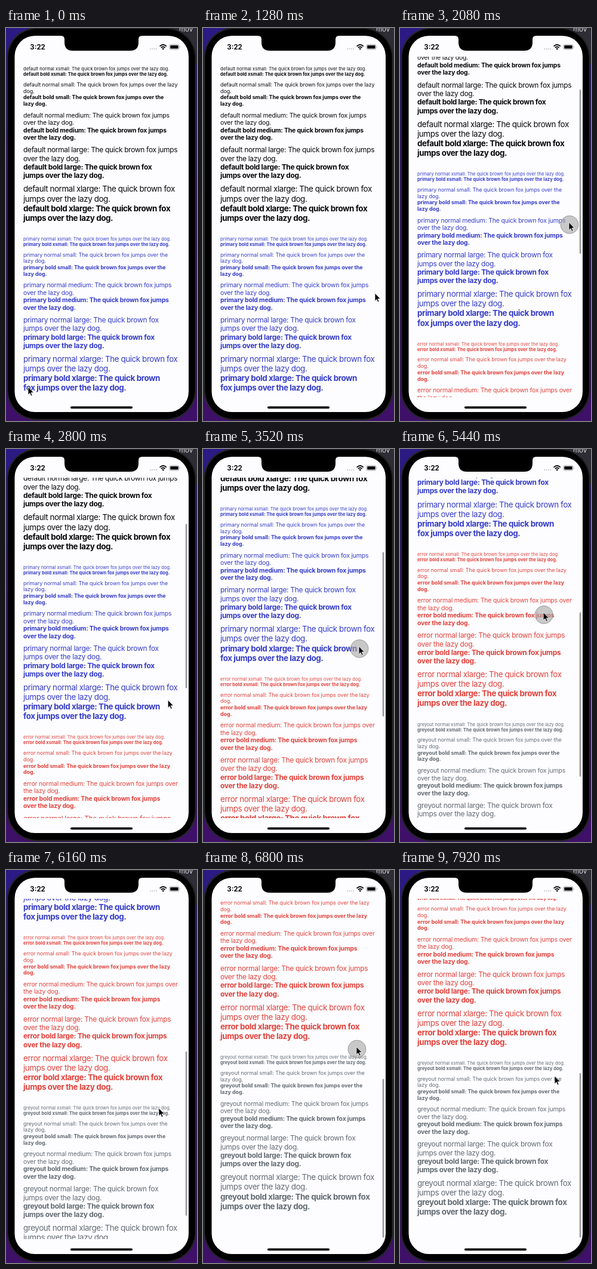
An HTML page for the animation above (8000 ms loop, 320 by 658 pixels).

```html
<!DOCTYPE html>
<html lang="en">
<head>
<meta charset="utf-8">
<title>Text styles</title>
<style>
  html, body { margin: 0; width: 100%; height: 100%; overflow: hidden; background: #1c1228; }
  svg { display: block; width: 320px; height: 658px; }
  text { font-family: Inter, "Liberation Sans", sans-serif; white-space: pre; }
  .bold { font-weight: 700; }
  .default { fill: #08080c; }
  .primary { fill: #353cc6; }
  .error { fill: #e0423c; }
  .greyout { fill: #636b72; }
</style>
</head>
<body>
<svg viewBox="0 0 320 658">
  <defs>
    <linearGradient id="desk" x2="0" y2="1">
      <stop offset="0" stop-color="#2c1a84"/>
      <stop offset="1" stop-color="#3f1068"/>
    </linearGradient>
    <clipPath id="view"><rect x="15" y="48" width="291" height="570"/></clipPath>
  </defs>

  <rect width="320" height="658" fill="url(#desk)"/>
  <path d="M250 0h70v60z" fill="#2e2c34"/>
  <text x="290" y="6" font-size="11.5" fill="#dcdce0">mov</text>

  <rect x="1" y="-1" width="318" height="658" rx="51" fill="#242428"/>
  <rect x="3.5" y="1.5" width="313" height="653" rx="48" fill="#000"/>
  <rect x="14.5" y="13" width="291.5" height="630" rx="34" fill="#fdfdff"/>
  <path d="M92 12.5h136v.5q-6 0-6 6v5q0 14-14 14h-96q-14 0-14-14v-5q0-6-6-6z" fill="#000"/>

  <text class="bold" x="53" y="36" font-size="11.3" text-anchor="middle" fill="#08080c">3:22</text>
  <path d="M242 35h10.2" stroke="#c0c0c6" stroke-width="2" stroke-linecap="round" stroke-dasharray="0 3.3"/>
  <g fill="none" stroke="#08080c" stroke-width="1.9">
    <path d="M257.6 30.6q5.6-5 11.2 0"/>
    <path d="M259.8 33q3.4-3 6.8 0"/>
  </g>
  <path d="M261.2 34.5q2-1.6 4 0l-2 2.2z" fill="#08080c"/>
  <rect x="273.9" y="27.7" width="16" height="8.2" rx="2.4" fill="none" stroke="#8c8c92" stroke-width=".8"/>
  <rect x="275.2" y="29" width="13.4" height="5.6" rx="1.3" fill="#08080c"/>
  <path d="M291 30.3q1.4 1.5 0 3z" fill="#8c8c92"/>

  <g clip-path="url(#view)"><g id="list"></g></g>
  <rect id="bar" x="300.8" width="2.4" rx="1.2" fill="#94949e"/>
  <rect x="108" y="633.4" width="104" height="3.8" rx="1.9" fill="#000"/>

  <g id="pointer">
    <circle id="touch" cx="1" cy="3" r="15" fill="#a2a2a2" fill-opacity=".58" stroke="#808080" stroke-opacity=".7"/>
    <path d="M0-1v13.2l3-2.8 2 4.7 2.1-.9-2-4.6h4.2z" fill="#000" stroke="#fff" stroke-width=".8"/>
  </g>
</svg>
<script>
const $ = id => document.getElementById(id);
const LOOP = 8000, MAX = 599, SLOP = 10;
const words = 'The quick brown fox jumps over the lazy dog.'.split(' ');
const sizeNames = ['xsmall', 'small', 'medium', 'large', 'xlarge'];
// words on the first line, normal then bold for each size
const themes = {
  default: '9987555444',
  primary: '9977554443',
  error: '9988655544',
  greyout: '9977554444'
};

function addLine(str, style, size, y, spacing) {
  const el = document.createElementNS('http://www.w3.org/2000/svg', 'text');
  const attrs = { class: style, x: 29, y, 'font-size': size, 'letter-spacing': spacing };
  for (const key in attrs) el.setAttribute(key, attrs[key]);
  el.textContent = str;
  $('list').append(el);
}

function buildList() {
  let y = 64;
  for (const [theme, fits] of Object.entries(themes)) {
    sizeNames.forEach((name, i) => {
      const points = 10 + 2 * i;
      const size = points * 0.746, height = points * 0.892;
      ['normal', 'bold'].forEach((weight, j) => {
        const n = +fits[i * 2 + j];
        const lines = [`${theme} ${weight} ${name}: ${words.slice(0, n).join(' ')}`];
        if (n < words.length) lines.push(words.slice(n).join(' '));
        for (const str of lines) {
          addLine(str, `${theme} ${weight}`, size, y + height / 2 + size * 0.364, 0.07 - 0.122 * i);
          y += height;
        }
      });
      y += 7.46;
    });
    y += 15.4;
  }
}

// each drag eases from one point to another; the pointer glides between drags
const drags = [
  { down: 1300, up: 2500, from: [288, 445], to: [281, 280] },
  { down: 2960, up: 3800, from: [270, 439], to: [258, 294] },
  { down: 4700, up: 5808, from: [252, 456], to: [236, 212] },
  { down: 6250, up: 6850, from: [256, 400], to: [257, 295] }
];
const first = { up: 200, to: [37, 602] };
const last = { down: 7500, from: [259, 346] };

const clamp = (v, lo, hi) => Math.min(hi, Math.max(lo, v));
const ease = u => u * u * (3 - 2 * u);
const glide = (t, t0, t1, a, b) => {
  const e = ease(clamp((t - t0) / (t1 - t0), 0, 1));
  return a.map((v, i) => v + (b[i] - v) * e);
};

function pointerAt(t) {
  const i = drags.findIndex(d => t < d.up);
  const next = drags[i] || last;
  if (t >= next.down) return next.to ? glide(t, next.down, next.up, next.from, next.to) : next.from;
  const prev = i < 0 ? drags[drags.length - 1] : drags[i - 1] || first;
  return glide(t, prev.up, next.down - 80, prev.to, next.from);
}

function scrollAt(t) {
  let s = 0;
  for (const d of drags) {
    if (t < d.down) break;
    const y = glide(t, d.down, d.up, d.from, d.to)[1];
    s += Math.max(0, d.from[1] - SLOP - y);
  }
  const over = Math.max(0, s - MAX) * 0.55;
  const release = drags[drags.length - 1].up;
  return Math.min(s, MAX) + over * Math.exp(-Math.max(0, t - release) / 110);
}

function draw(t) {
  const s = scrollAt(t);
  const barTop = 50.5 + s * 0.4835 + Math.max(0, s - MAX) * 0.5;
  $('list').setAttribute('transform', `translate(0 ${-s})`);
  $('bar').setAttribute('y', barTop);
  $('bar').setAttribute('height', Math.min(275, 615.5 - barTop));
  $('bar').setAttribute('opacity', clamp((t - drags[0].down) / 200, 0, 1));
  $('pointer').setAttribute('transform', `translate(${pointerAt(t)})`);
  $('touch').setAttribute('opacity', drags.some(d => t >= d.down && t < d.up) ? 1 : 0);
}

buildList();
const start = performance.now();
function tick() {
  draw((performance.now() - start) % LOOP);
  requestAnimationFrame(tick);
}
tick();
</script>
</body>
</html>
```
